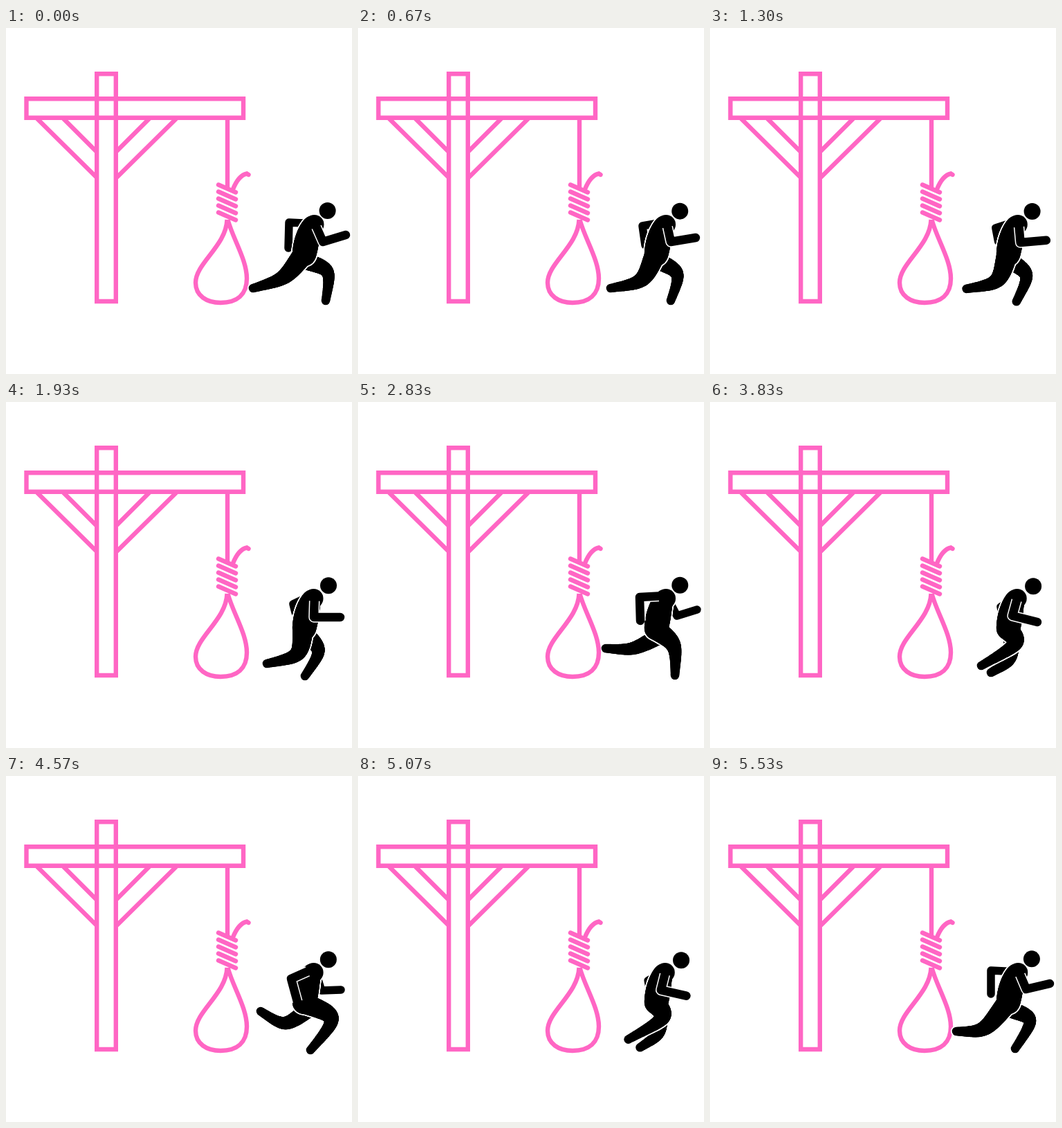
An HTML page with a canvas for the animation above (5560 ms loop, 500 by 500 pixels).

```html
<!DOCTYPE html>
<html>
<head>
<meta charset="utf-8">
<style>
html, body { margin: 0; width: 100%; height: 100%; overflow: hidden; background: #fff; }
svg, canvas { position: absolute; left: 0; top: 0; width: 500px; height: 500px; }
</style>
</head>
<body>
<svg viewBox="0 0 500 500" fill="none" stroke="#ff66c4" stroke-width="6.4">
  <path d="M45 131L131 216M83 131L131 179M246 131L160 216M207 131L160 178"/>
  <path fill="#fff" d="M29.5 102.2H343V129.8H29.5ZM131.2 66.2H158.8V395H131.2Z"/>
  <path d="M320 132V230M319.500 277C318 315 274 340 274 368C274 387 290 397 310 397C334 397 348 385 348 362C348 335 328 305 320.500 277"/>
  <path stroke-linecap="round" d="M307 226.500l25 11m-25-1l25 11m-25-1l25 11m-25-1l25 11m-25-1l25 11M328 233Q336 213 348 210.500L350.500 212"/>
</svg>
<canvas id="stage" width="500" height="500"></canvas>
<script>
const ctx = document.getElementById('stage').getContext('2d');
const LOOP = 5560, FRAMES = 167, STRIDES = 9, CYCLE = 167;

// phase, then near elbow, hand, knee, foot and far elbow, hand, knee, foot
const poses = [
  [0, 458,309, 491,299, 403,363, 357,376, 409,281, 408,318, 470,349, 462,394],
  [13, 452,309, 488,303, 413,368, 365,376, 411,286, 415,314, 467,353, 452,394],
  [21, 445,311, 483,311, 426,368, 377,378, 415,292, 418,304, 457,359, 432,396],
  [33, 437,309, 473,318, 450,348, 392,381, 420,296, 424,314, 436,374, 406,391],
  [64, 412,293, 421,326, 482,347, 440,396, 456,310, 484,309, 403,363, 368,340],
  [97, 407,282, 408,316, 460,349, 458,395, 461,309, 490,300, 397,359, 358,356],
  [158, 457,308, 491,300, 397,370, 356,369, 406,281, 406,315, 470,350, 441,394]
];

// Half a cycle later the two sides trade places.
const keys = poses.map(p => ({ t: p[0], v: p.slice(1) }));
for (const [t, ...v] of poses) {
  const half = (t + CYCLE / 2) % CYCLE;
  if (keys.every(k => Math.abs(k.t - half) > 2))
    keys.push({ t: half, v: [...v.slice(8), ...v.slice(0, 8)] });
}
keys.sort((a, b) => a.t - b.t);

function keyAt(i) {
  const n = keys.length, k = keys[(i + n) % n];
  return { t: k.t + Math.floor(i / n) * CYCLE, v: k.v };
}

function poseAt(phase) {
  let i = keys.length - 1;
  while (keys[i].t > phase) i--;
  const [a, b, c, d] = [-1, 0, 1, 2].map(o => keyAt(i + o));
  const span = c.t - b.t, u = (phase - b.t) / span;
  return b.v.map((p, j) => {
    const m = (c.v[j] - a.v[j]) / (c.t - a.t) * span;
    const n = (d.v[j] - b.v[j]) / (d.t - b.t) * span;
    const q = c.v[j];
    return p + u * (m + u * (3 * (q - p) - 2 * m - n + u * (2 * (p - q) + m + n)));
  });
}

const mix = (a, b, u) => a + (b - a) * u;

function dot(x, y, r) {
  ctx.beginPath();
  ctx.arc(x, y, r, 0, 7);
  ctx.fill();
}

// Tapered limb bending towards the knee
function leg(hip, [kx, ky, fx, fy], r, grow = 0) {
  for (let i = 0; i <= 60; i++) {
    const u = i / 60, a = (1 - u) ** 3, c = u ** 3, b = 1 - a - c;
    dot(hip[0] * a + kx * b + fx * c, hip[1] * a + ky * b + fy * c, mix(r, 6.3, u) + grow);
  }
}

function torso(sway, grow = 0) {
  for (let i = 0; i <= 30; i++) {
    const u = i / 30;
    dot(mix(445.5 - sway, 431, Math.sqrt(u)), mix(284, 327, u),
        14 + 4 * Math.sin(u * 2.2) + grow);
  }
}

function arm([sx, sy], [ex, ey, hx, hy], width, color = '#000', from = 0) {
  ctx.beginPath();
  ctx.moveTo(mix(sx, ex, from), mix(sy, ey, from));
  ctx.lineTo(ex, ey);
  ctx.lineTo(hx, hy);
  ctx.strokeStyle = color;
  ctx.lineWidth = width;
  ctx.lineJoin = 'round';
  ctx.lineCap = from ? 'butt' : 'round';
  ctx.stroke();
}

function draw(now) {
  const frame = Math.floor((now % LOOP + 4) * FRAMES / LOOP) % FRAMES;
  const phase = frame * STRIDES % CYCLE;
  const angle = phase / CYCLE * 2 * Math.PI;
  const swing = Math.cos(angle), bob = Math.cos(2 * angle);
  const p = poseAt(phase);
  const nearHip = [429, 328], farHip = [436, 338];
  const nearShoulder = [443 + 4 * swing, 282 + 2 * swing];
  const farShoulder = [441 - 11 * swing, 286 - 4 * swing];
  const nearArm = p.slice(0, 4), nearLeg = p.slice(4, 8);
  const sway = 1 - bob;

  ctx.clearRect(0, 0, 500, 500);
  ctx.fillStyle = '#000';
  arm(farShoulder, p.slice(8, 12), 11.5);
  leg(farHip, p.slice(12), 12);

  ctx.fillStyle = '#fff';
  leg(nearHip, nearLeg, 15, 1.8);
  torso(sway, 1.8);
  ctx.fillStyle = '#000';
  leg(nearHip, nearLeg, 15);
  torso(sway);

  arm(nearShoulder, nearArm, 15.5, '#fff', 0.15);
  arm(nearShoulder, nearArm, 12.5);
  dot(466 - 1.4 * bob, 265.3 - 1.2 * bob, 12);
}

function tick() {
  draw(performance.now());
  requestAnimationFrame(tick);
}
tick();
</script>
</body>
</html>
```
